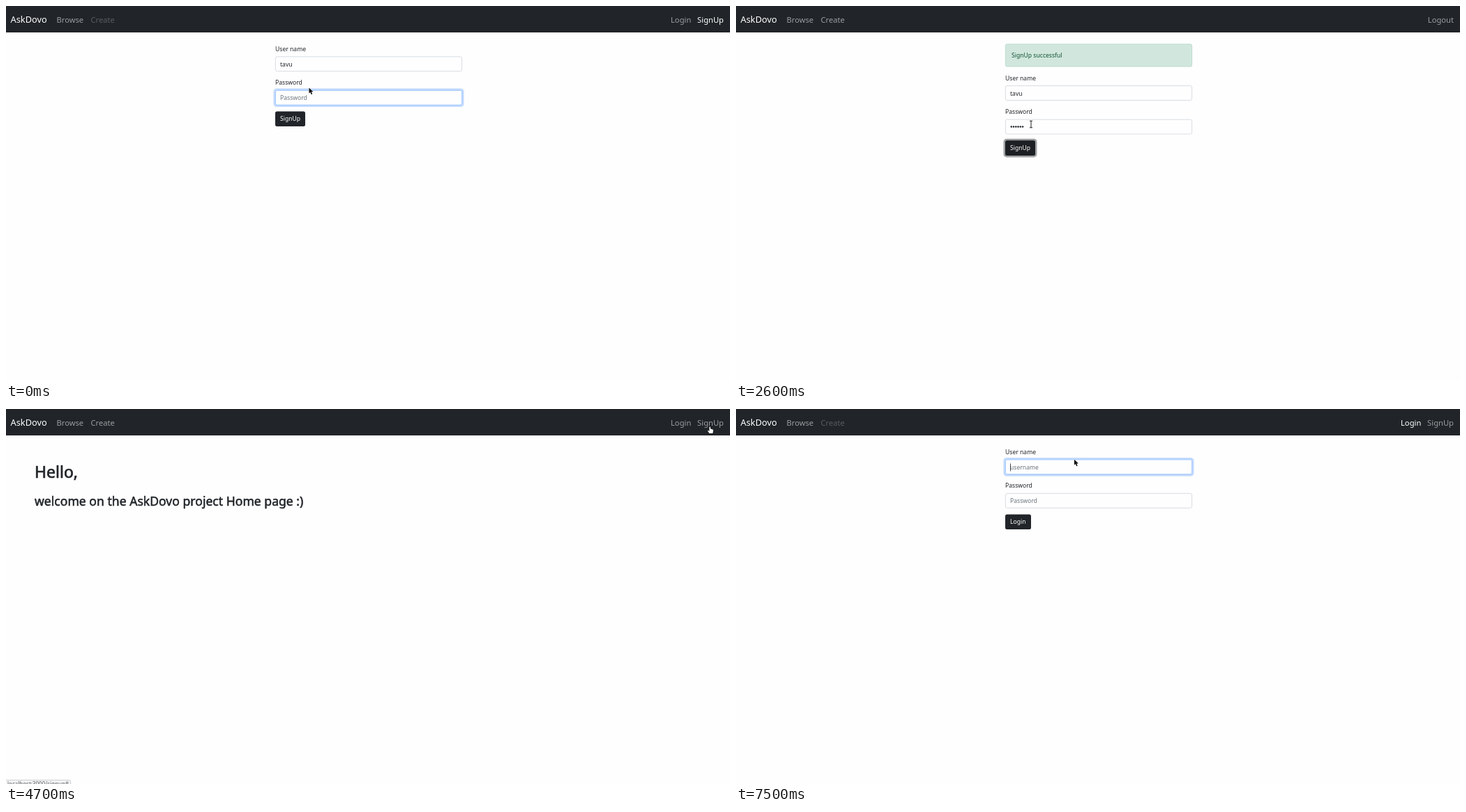
These frames come from a looping animation (1038 px wide and 539 px high, 8 s). An HTML page with a canvas:

```html
<!DOCTYPE html>
<html lang="en">
<head>
<meta charset="utf-8">
<title>Sign up and log in</title>
<style>
html, body { margin: 0; width: 100%; height: 100%; overflow: hidden; background: #fefefe; }
canvas { display: block; }
</style>
</head>
<body>
<canvas id="stage" width="1038" height="539"></canvas>
<script>
const ctx = document.getElementById('stage').getContext('2d');
const LOOP = 8000, TICK = 100;
const BRAND = 'AskDovo', USER = 'tavu';
const INK = '#212529', PAPER = '#fefefe', MUTED = '#6c757d';
const SMALL = 8.6, NAV = 11.2;
const LEFT = 386, WIDTH = 268, ROW = 21.6;

// Pointer path: time, x, y, kind (a = arrow, i = text beam, h = hand, empty = hidden)
const PATH = [
  [0, 434, 117, 'a'], [700, 434, 117, 'a'], [1000, 432, 122, 'i'], [1400, 430, 132, 'i'],
  [1500, 430, 132, 'i'], [1600, 429, 139.5, 'i'], [1900, 427, 146, 'a'], [2100, 424, 153, 'h'],
  [2400, 423, 157, 'h'], [2500, 423, 157, 'h'], [2600, 423, 170, 'i'], [3000, 423, 170, 'i'],
  [3100, 340, 138, 'a'], [3300, 152.5, 62, 'a'], [3700, 939, 24, 'a'], [3800, 939, 24, 'a'],
  [3900, 939, 24, ''], [4100, 975, 32, 'a'], [4200, 1000, 29, 'h'], [4300, 1010, 25, 'h'],
  [4900, 1010, 25, 'h'], [5400, 966, 17, 'h'], [5600, 966, 17, 'h'], [6000, 966, 11, 'h'],
  [6300, 965, 14, 'h'], [6500, 965, 14, 'h'], [6600, 900, 30, 'a'], [7100, 484.5, 72, 'a'],
  [LOOP, 484.5, 72, 'a']
];
const KEY_TIMES = [900, 1100, 1300, 1600, 1800, 2000];

const white = alpha => `rgba(255,255,255,${alpha})`;
const clamp = v => Math.max(0, Math.min(1, v));

function text(str, x, y, size, color, { align = 'left', weight = 0 } = {}) {
  ctx.font = `${size}px "Noto Sans", "Open Sans", sans-serif`;
  ctx.textAlign = align;
  ctx.fillStyle = color;
  ctx.fillText(str, x, y);
  if (weight) {
    ctx.strokeStyle = color;
    ctx.lineWidth = weight;
    ctx.lineJoin = 'round';
    ctx.strokeText(str, x, y);
  }
}

function box(x, y, w, h, r, fill, border) {
  ctx.beginPath();
  ctx.roundRect(x, y, w, h, r);
  ctx.fillStyle = fill;
  ctx.fill();
  if (!border) return;
  ctx.beginPath();
  ctx.roundRect(x + .35, y + .35, w - .7, h - .7, r);
  ctx.strokeStyle = border;
  ctx.lineWidth = .8;
  ctx.stroke();
}

function ring(x, y, w, h, rgb, alpha) {
  const s = 2.5;
  box(x - s, y - s, w + 2 * s, h + 2 * s, 4.5, PAPER);
  box(x - s, y - s, w + 2 * s, h + 2 * s, 4.5, `rgba(${rgb},${alpha})`);
}

function caret(x, y) {
  ctx.fillStyle = INK;
  ctx.fillRect(x, y - 5, .8, 11);
}

function input(y, { value, hint, dots = 0, focus = 0, caretOn = false }) {
  if (focus) ring(LEFT, y, WIDTH, ROW, '13,110,253', .25 * focus);
  box(LEFT, y, WIDTH, ROW, 2.5, PAPER, focus ? '#86b7fe' : '#ced4da');
  const mid = y + 10.9;
  if (value) text(value, 393, Math.round(y + 14.3), SMALL, INK);
  else if (!dots) text(hint, 393, Math.round(y + 14.3), SMALL, MUTED);
  ctx.fillStyle = INK;
  for (let i = 0; i < dots; i++) {
    ctx.beginPath();
    ctx.arc(394.8 + 3.25 * i, mid - .2, 1.25, 0, 7);
    ctx.fill();
  }
  if (caretOn) caret(393 + 3.3 * dots, mid);
}

function form(top, label, user, pass, button) {
  text('User name', LEFT, Math.round(top + 65), SMALL, INK);
  input(top + 72.5, { hint: 'username', ...user });
  text('Password', LEFT, Math.round(top + 113.2), SMALL, INK);
  input(top + 121, { hint: 'Password', ...pass });
  const y = top + 151.5;
  if (button.focus) ring(LEFT, y, button.width, ROW, '66,70,73', .5 * button.focus);
  box(LEFT, y, button.width, ROW, 2.5, button.hover ? '#1c1f23' : INK);
  text(label, 393, Math.round(y + 13.7), SMALL, '#fff');
}

function navbar(page, t) {
  ctx.fillStyle = INK;
  ctx.fillRect(0, 0, 1038, 38);
  const link = (str, x, alpha, align) => text(str, x, 24, NAV, white(alpha), { align });
  text(BRAND, 6.5, 24, 12.8, '#fff');
  link('Browse', 72.5, .55);
  link('Create', 121.5, page === 'signup' || page === 'login' ? .25 : .55);
  if (page === 'signedUp') {
    link('Logout', 1029, t >= 4300 ? .75 : .55, 'right');
    return;
  }
  const loginHover = page === 'home' && t >= 5300;
  const signHover = page === 'home' && t >= 4800 && t < 5200;
  link('Login', 953, page === 'login' ? 1 : loginHover ? .75 : .55);
  link('SignUp', 1029, page === 'signup' ? 1 : signHover ? .75 : .55, 'right');
}

function statusBubble(t) {
  if (t < 4300 || t >= 6800) return;
  const path = t < 4800 ? 'signup#' : t < 5300 ? 'signup' : 'login';
  const width = { 'signup#': 93, signup: 88, login: 81 }[path];
  ctx.globalAlpha = clamp((6800 - t) / 500);
  box(-3, 533, width + 3, 14, 2.5, '#f1f3f4', '#c4c6c8');
  text('localhost:3000/' + path, 2, 542, 8, '#5f6368');
  ctx.globalAlpha = 1;
}

function shape(points, fill, stroke, width) {
  ctx.beginPath();
  points.forEach(([x, y]) => ctx.lineTo(x, y));
  ctx.closePath();
  ctx.lineJoin = 'round';
  ctx.lineWidth = width;
  ctx.strokeStyle = stroke;
  ctx.stroke();
  ctx.fillStyle = fill;
  ctx.fill();
}

const POINTERS = {
  a() {
    shape([[.4, .5], [.4, 8.6], [2.3, 7], [3.7, 10.2], [5.2, 9.5], [3.8, 6.5], [6.4, 6.3]],
      '#111', '#fff', 1);
  },
  i() {
    ctx.strokeStyle = '#222';
    ctx.lineWidth = 1;
    ctx.beginPath();
    for (const y of [-4.8, 4.8]) {
      ctx.moveTo(-2, y);
      ctx.lineTo(2, y);
    }
    ctx.moveTo(0, -4.8);
    ctx.lineTo(0, 4.8);
    ctx.stroke();
  },
  h() {
    shape([[-1.6, .5], [-.2, .5], [.2, 3.4], [3.6, 4.4], [4.1, 6], [3.2, 10], [-1.6, 10],
      [-4, 6.6], [-3.4, 5.7], [-1.6, 6.8]], '#fff', '#111', 1);
  }
};

function pointer(t) {
  let i = PATH.length - 2;
  while (PATH[i][0] > t) i--;
  const [t0, x0, y0, kind] = PATH[i], [t1, x1, y1] = PATH[i + 1];
  if (!kind) return;
  const k = (t - t0) / (t1 - t0);
  ctx.save();
  ctx.translate(x0 + (x1 - x0) * k, y0 + (y1 - y0) * k);
  POINTERS[kind]();
  ctx.restore();
}

function draw(t) {
  const page = t < 2600 ? 'signup' : t < 4600 ? 'signedUp' : t < 6300 ? 'home' : 'login';
  ctx.fillStyle = PAPER;
  ctx.fillRect(0, 0, 1038, 539);
  navbar(page, t);

  if (page === 'signup') {
    const dots = KEY_TIMES.filter(k => k <= t).length;
    const pressed = clamp((t - 2200) / 200);
    const caretOn = t >= 300 && t < 2300 && (t < 800 || t >= 900);
    form(0, 'SignUp', { value: USER }, { dots, focus: 1 - pressed, caretOn },
      { width: 43, focus: pressed, hover: t >= 2100 });
  } else if (page === 'signedUp') {
    box(LEFT, 54.5, WIDTH, 32.7, 2.5, '#d1e7dd', '#badbcc');
    text('SignUp successful', 395, 74, SMALL, '#0f5132');
    form(41.8, 'SignUp', { value: USER }, { dots: 6 }, { width: 43, focus: 1, hover: true });
  } else if (page === 'home') {
    text('Hello,', 41, 99, 23, INK, { weight: .7 });
    text(`welcome on the ${BRAND} project Home page :)`, 41, 139, 17.6, INK, { weight: .55 });
  } else {
    form(0, 'Login', { focus: clamp((t - 7300) / 200), caretOn: t >= 7400 }, {}, { width: 37 });
  }

  statusBubble(t);
  pointer(t);
}

const start = performance.now();
function loop() {
  const t = (performance.now() - start) % LOOP;
  draw(Math.floor(t / TICK) * TICK);
  requestAnimationFrame(loop);
}
loop();
</script>
</body>
</html>
```
